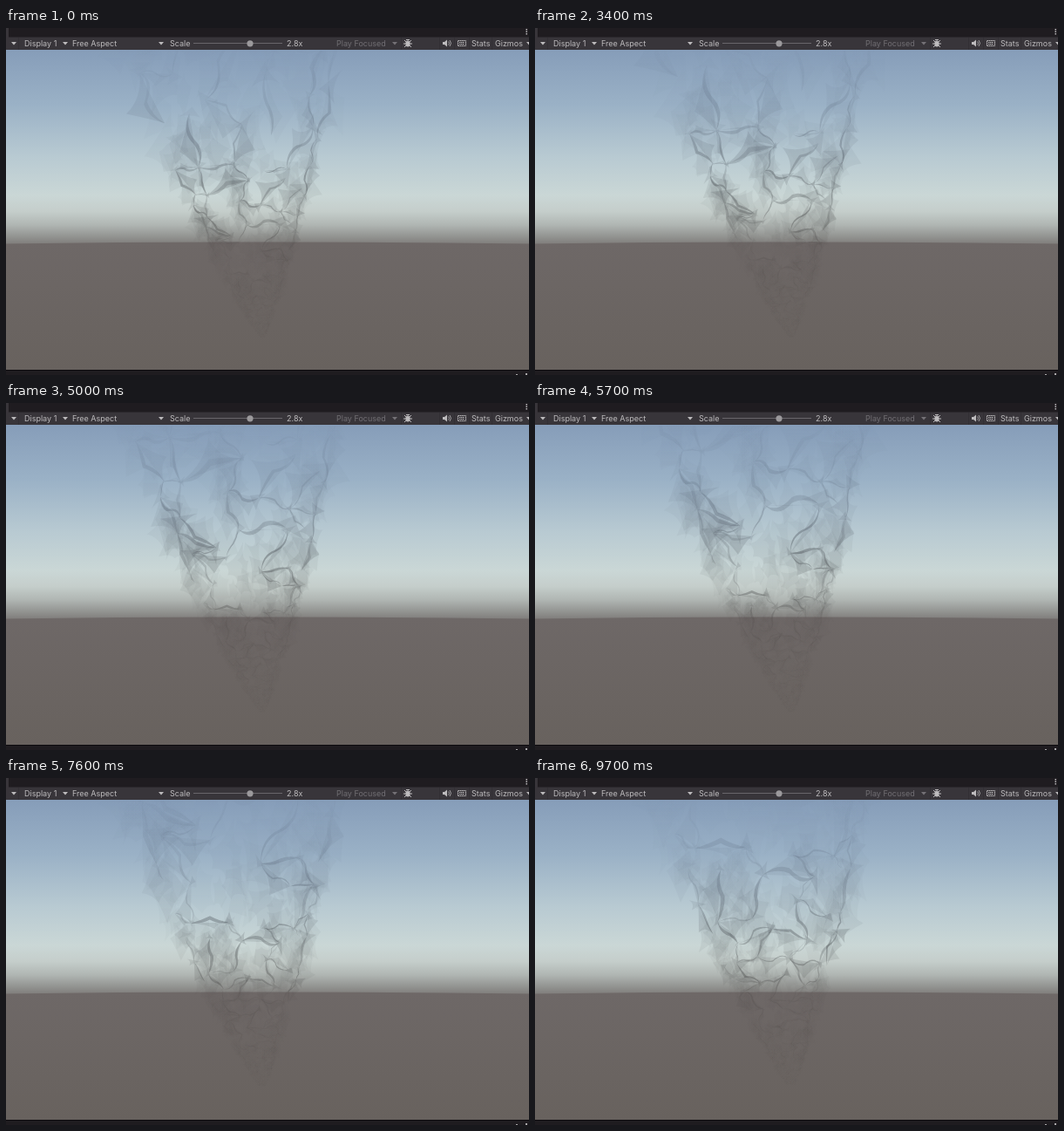
Animation, 600 px wide and 398 px high, one loop 9800 ms. Source, as an HTML page with a canvas:

```html
<!DOCTYPE html>
<html lang="en">
<head>
<meta charset="utf-8">
<title>Smoke funnel</title>
<style>
html, body { margin: 0; width: 100%; height: 100%; overflow: hidden; background: #1f1c20; }
svg, canvas { position: absolute; left: 0; top: 0; }
text { font: 9px Inter, sans-serif; fill: #bdbbbd; }
</style>
</head>
<body>
<svg width="600" height="398" viewBox="0 0 600 398">
  <defs>
    <linearGradient id="sky" gradientUnits="userSpaceOnUse" x1="0" y1="25" x2="0" y2="248">
      <stop offset="0" stop-color="#869db9"/>
      <stop offset=".28" stop-color="#9ab1c6"/>
      <stop offset=".55" stop-color="#b8cad2"/>
      <stop offset=".75" stop-color="#cad7d6"/>
      <stop offset=".83" stop-color="#c5cecb"/>
      <stop offset=".9" stop-color="#b0b6b3"/>
      <stop offset="1" stop-color="#7f7d7b"/>
    </linearGradient>
    <linearGradient id="ground" x1="0" y1="0" x2="0" y2="1">
      <stop offset="0" stop-color="#6e6867"/>
      <stop offset="1" stop-color="#68625e"/>
    </linearGradient>
    <path id="arrow" d="M-3-1.5h6L0 2z"/>
  </defs>
  <path d="M0 0h3v11h-3z" fill="#38353a"/>
  <path d="M0 10.5h600v14.5h-600z" fill="#38353a"/>
  <path d="M14.500 11v14M453.500 11v14M497.500 11v14M514.500 11v14M531.500 11v14M557.500 11v14" stroke="#322f34"/>
  <g fill="#bdbbbd">
    <use href="#arrow" x="9" y="17.500"/>
    <use href="#arrow" x="68" y="17.500"/>
    <use href="#arrow" x="178" y="17.500"/>
    <use href="#arrow" x="446" y="17.500" fill="#747176"/>
    <use href="#arrow" x="600" y="17.500"/>
    <path d="M596.500 1h1.500v1.500h-1.500zm0 2.500h1.500v1.500h-1.500zm0 2.500h1.500v1.500h-1.500z"/>
    <path d="M501 16h2l3-2.500v8l-3-2.500h-2z"/>
    <ellipse cx="461" cy="18" rx="2.600" ry="3.600"/>
  </g>
  <g fill="none" stroke="#bdbbbd">
    <path d="M457 14l2 2M465 14l-2 2M456 18h10M457 22l2-2M465 22l-2-2M459 13.500h4"/>
    <path d="M507.500 15.500q2 2 0 4M509 14q3 3.500 0 7" stroke-width=".8"/>
    <path d="M518.500 14.500h9v6h-9zM520 16.500h6M520 18.500h6" stroke-dasharray="1.500 .5"/>
  </g>
  <path d="M215 17.500h102" stroke="#69666b"/>
  <circle cx="280" cy="17.800" r="3.600" fill="#9b999c"/>
  <text x="21" y="21">Display 1</text>
  <text x="76" y="21">Free Aspect</text>
  <text x="188" y="21">Scale</text>
  <text x="322" y="21">2.8x</text>
  <text x="379" y="21" style="fill:#716e73">Play Focused</text>
  <text x="534" y="21">Stats</text>
  <text x="561" y="21">Gizmos</text>
  <path d="M0 25h600v224h-600z" fill="url(#sky)"/>
  <path d="M0 247.500Q300 243.500 600 247.500V392H0z" fill="url(#ground)"/>
  <path d="M0 392h600v1h-600z" fill="#0c0a0d"/>
  <path d="M585 398v-1h2v1M596 398v-2h2v2" fill="#aaa8aa"/>
</svg>
<canvas id="smoke" width="600" height="398"></canvas>
<script>
const ctx = document.getElementById('smoke').getContext('2d');
const LOOP = 9800, START = 2300, ZOOM_RATE = 0.177;
const APEX_X = 295, APEX_Y = 357;

let seed = 21;
function random() {
  seed = seed + 0x6D2B79F5 | 0;
  let r = Math.imul(seed ^ seed >>> 15, 1 | seed);
  r = r + Math.imul(r ^ r >>> 7, 61 | r) ^ r;
  return ((r ^ r >>> 14) >>> 0) / 4294967296;
}
const between = (a, b) => a + (b - a) * random();
const mix = (a, b, k) => [a[0] + (b[0] - a[0]) * k, a[1] + (b[1] - a[1]) * k];

// Point on the cone, relative to the apex: side runs from -1 (left) to 1 (right).
const onCone = (side, depth) => [depth * (-0.13 + 0.43 * Math.sin(side * 1.5)), -depth];

const shapes = [];

// Closed shape whose sides are pinched towards the centre.
function addPatch(alpha, center, corners, pinch) {
  const points = corners.flatMap((p, i) => {
    const middle = mix(p, corners[(i + 1) % corners.length], between(0.3, 0.7));
    return [p, mix(middle, center, between(0, pinch))];
  });
  shapes.push({ alpha, points });
}

function addStar(alpha, center, size, count, stretch, pinch) {
  const turn = between(0, 6.28);
  const corners = Array.from({ length: count }, (_, i) => {
    const angle = turn + (i + between(-0.3, 0.3)) / count * 6.28, r = size * between(0.5, 1.2);
    return [center[0] + r * Math.cos(angle), center[1] + r * stretch * Math.sin(angle)];
  });
  addPatch(alpha, center, corners, pinch);
}

// Thin crooked fold between two points, with a wider veil on one side.
function addFold(a, b) {
  const size = Math.hypot(b[0] - a[0], b[1] - a[1]);
  const beside = (k, offset) => {
    const [x, y] = mix(a, b, k);
    return [x - (b[1] - a[1]) * offset, y + (b[0] - a[0]) * offset];
  };
  const bend = between(-0.2, 0.2), kink = between(-0.15, 0.15);
  const half = between(0.015, 0.05);
  shapes.push({ alpha: between(0.18, 0.42), points: [
    a, beside(0.25, bend + half), beside(0.5, kink + half), beside(0.75, -bend + half),
    b, beside(0.75, -bend - half), beside(0.5, kink - half), beside(0.25, bend - half)] });
  const veil = between(-0.55, 0.55);
  addPatch(between(0.08, 0.2), beside(0.5, 0), [a, beside(between(0.2, 0.8), veil), b], 0.6);
  addStar(between(0.08, 0.22), a, size * between(0.15, 0.4), 3, 1, 0.95);
}

for (let i = 0; i < 560; i++) {
  const depth = Math.exp(between(0.4, 5.9));
  const center = onCone(between(-1, 1), depth);
  addStar(between(0.025, 0.075), center, depth * between(0.06, 0.13), 4 + i % 3, 1.5, 0.7);
}

// Net of folds: rows at equal ratios of depth, so it looks alike at every zoom.
const ROWS = 27, COLUMNS = 6;
const net = Array.from({ length: ROWS }, (_, row) => Array.from({ length: COLUMNS }, (_, col) => {
  const side = (col + row % 2 / 2 + between(-0.3, 0.3)) / (COLUMNS - 0.5) * 2 - 0.9;
  return onCone(Math.max(-1, Math.min(1, side)), Math.exp(1.7 + 0.165 * (row + between(-0.4, 0.4))));
}));
for (let row = 1; row < ROWS; row++) {
  for (let col = 0; col < COLUMNS; col++) {
    const node = net[row][col];
    if (random() < 0.72) addFold(node, net[row - 1][col]);
    if (col && random() < 0.5) addFold(node, net[row][col - 1]);
  }
}

const shade = ctx.createLinearGradient(0, 26, 0, 365);
[[0, '95,112,135,.15'], [0.15, '88,102,122,.5'], [0.3, '82,92,106,.8'], [0.42, '76,82,88,1'],
 [0.6, '78,79,78,1'], [0.65, '74,69,68,.55'], [0.8, '76,70,68,.4'], [1, '80,74,72,.2']]
  .forEach(([stop, color]) => shade.addColorStop(stop, `rgba(${color})`));
ctx.fillStyle = shade;
ctx.beginPath();
ctx.rect(0, 26, 600, 366);
ctx.clip();

function draw() {
  const time = Math.floor(performance.now() % LOOP / 100) * 100;
  const scale = Math.exp(ZOOM_RATE * Math.max(0, time - START) / 1000);
  const project = ([x, y]) => {
    const depth = Math.max(0, -y * scale);
    const width = (1 - 0.0006 * depth) * (1 + 12 / (depth + 10));
    return [APEX_X + x * scale * width, APEX_Y + y * scale];
  };
  ctx.clearRect(0, 0, 600, 398);
  for (const { alpha, points } of shapes) {
    const placed = points.map(project);
    ctx.globalAlpha = alpha;
    ctx.beginPath();
    ctx.moveTo(...placed[0]);
    for (let i = 1; i < placed.length; i += 2) {
      ctx.quadraticCurveTo(...placed[i], ...placed[(i + 1) % placed.length]);
    }
    ctx.fill();
  }
  requestAnimationFrame(draw);
}
draw();
</script>
</body>
</html>
```
